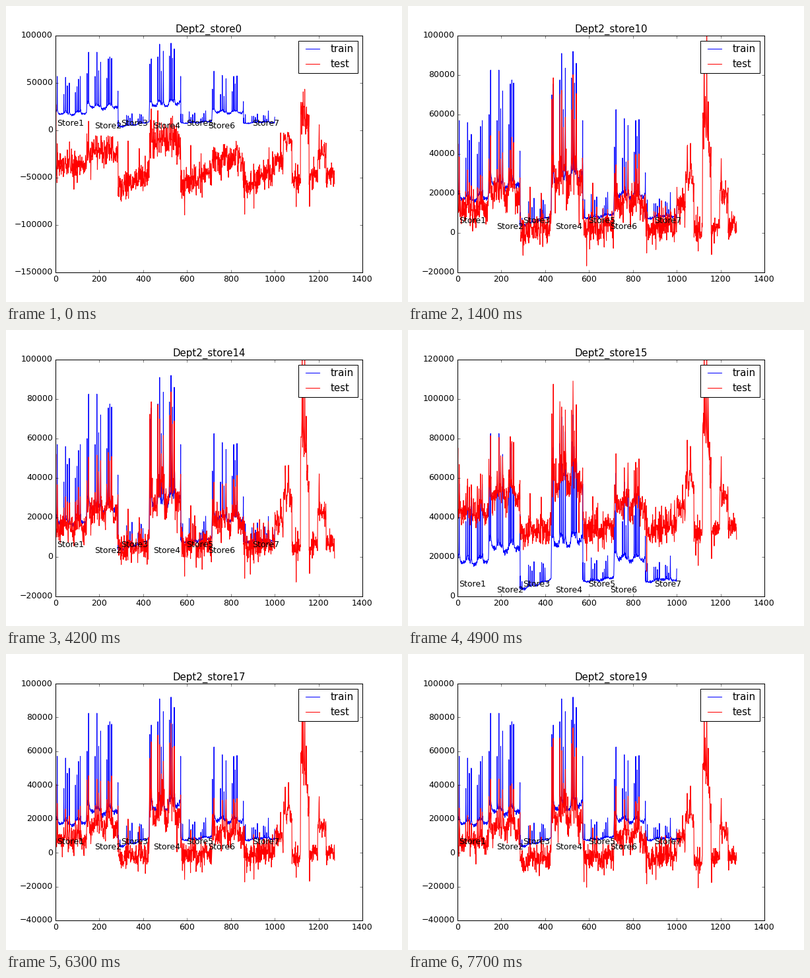
Recreate the animation shown at these times as a matplotlib script. Size 600 by 450 pixels, loop 8000 ms.

```python
import numpy as np
import matplotlib.pyplot as plt
from matplotlib.animation import FuncAnimation

plt.style.use("classic")
plt.rcParams.update({
    "font.sans-serif": ["DejaVu Sans"],
    "savefig.dpi": "figure",
    "savefig.facecolor": "white",
})

TRAIN_LEN, TEST_LEN = 143, 39
SPLIT = 7 * TRAIN_LEN
TOTAL = SPLIT + 7 * TEST_LEN
HOLD = 7  # ticks of 100 ms per chart
x = np.arange(TOTAL)

# Weekly sales in thousands: start, middle and end of each store
BASES = [(18, 16, 18), (26, 22, 24.5), (3.5, 5.2, 8.5), (26, 25.5, 28.5),
         (7.2, 7.8, 9.5), (20, 17.5, 18.5), (6.5, 8.5, 8)]
PEAK_WEEKS = np.array([1, 8, 38, 46, 54, 63, 91, 98, 105, 113, 142])
PEAKS = {
    0: [35, 57, 38, 56, 47, 50, 40, 46, 54, 57, 22],
    1: [60, 82.5, 57, 82.5, 63, 72, 55, 75.5, 77.5, 76, 41.5],
    3: [70, 75.5, 77.5, 91, 62.5, 83.5, 78.5, 92, 76, 86, 57],
    5: [43.5, 62.5, 38, 58, 36, 54.5, 41, 57, 49, 57.5, 30.5],
}
LATE_PEAKS = {1048: 14, 1063: 18, 1120: 16, 1125: 50, 1130: 26, 1137: 45,
              1144: 28, 1203: 12}
OUTLIERS = {2: 30, 331: 19, 382: 18, 589: -15, 617: 19, 863: -16, 905: -15,
            1098: -15, 1159: -14}

PROFILE = np.array([9, 16, 0, 22, 1, 12, 2])
NUMBERS = [0, 1, *range(10, 20)]
SHIFTS = [-54, -6, 1, 1, 2, -5, 4, 32, 1, -3, -2, -5]


def bump(center, size, width):
    return size * np.exp(-((x - center) / width) ** 2)


rng = np.random.default_rng(12)
train = np.zeros(SPLIT)
lift = np.zeros(TOTAL)
for k, base in enumerate(BASES):
    start = k * TRAIN_LEN
    curve = np.interp(np.arange(TRAIN_LEN), [0, 65, TRAIN_LEN - 1], base)
    floor = curve[PEAK_WEEKS]
    peaks = PEAKS.get(k, floor + 11 * rng.uniform(0.3, 1.2, floor.size))
    extra = np.maximum(peaks - floor, 0)
    skirt = sum(bump(start + w, 0.09 * e, 4) for w, e in zip(PEAK_WEEKS, extra))
    rough = rng.normal(0, 0.025 * np.mean(base) + 0.15, TRAIN_LEN)
    block = curve + rough + skirt[start:start + TRAIN_LEN]
    block[PEAK_WEEKS] = np.maximum(peaks, block[PEAK_WEEKS])
    train[start:start + TRAIN_LEN] = block

    gain = 0.7 if k == 3 else 0.48
    for w, e in zip(PEAK_WEEKS, extra):
        size = gain * e * rng.uniform(0.85, 1.1)
        lift += bump(start + w, 0.8 * size, 0.9) + bump(start + w, 0.2 * size, 5)
for pos, size in LATE_PEAKS.items():
    lift += bump(pos, 0.7 * size, 1.2) + bump(pos, 0.3 * size, 5)

early = x < SPLIT
store = np.where(early, x // TRAIN_LEN, (x - SPLIT) // TEST_LEN)
phase = np.where(early, x % TRAIN_LEN / TRAIN_LEN, 0.6)
spread = np.where(store == 3, 4.8, 3.5) * (1 + 0.4 * np.exp(-12 * phase))
shared = 0.75 * rng.standard_t(6, TOTAL)
for pos, size in OUTLIERS.items():
    shared[pos] = size / spread[pos]
level = PROFILE[store] * np.where(early, 1, 1.45)
drift = np.isin(store, [2, 4, 6]) * (2 * phase - 1)


def test_series(n):
    own = 0.5 * np.random.default_rng(100 + n).standard_t(7, TOTAL)
    contrast, noise, gain, slope = (1.8, 2, 0.5, 9) if n == 0 else (1.05, 1, 1.1, 1)
    return (SHIFTS[n] + contrast * level + slope * drift + gain * lift
            + noise * spread * (shared + own)) * 1000


def y_ticks(shift):
    if shift < -50:
        return np.arange(-150, 101, 50) * 1000
    if shift > 20:
        return np.arange(0, 121, 20) * 1000
    return np.arange(-40 if shift < -2 else -20, 101, 20) * 1000


tests = [test_series(n) for n in range(len(NUMBERS))]

fig = plt.figure(figsize=(8, 6), dpi=75, facecolor="white")
ax = fig.add_axes([0.125, 0.1, 0.775, 0.8])
ax.plot(x[:SPLIT], train * 1000, "b", label="train")
test_line, = ax.plot(x, tests[0], "r", label="test")
ax.set_xlim(0, 1400)
ax.legend(loc="upper right")
title = ax.set_title("")
for k, left in enumerate([5, 177, 298, 445, 597, 697, 897]):
    ax.text(left, 2000 if k % 2 else 5000, f"Store{k + 1}")


def draw(i):
    n = i // HOLD
    ticks = y_ticks(SHIFTS[n])
    test_line.set_ydata(tests[n])
    ax.set_yticks(ticks)
    ax.set_ylim(ticks[0], ticks[-1])
    title.set_text(f"Dept2_store{NUMBERS[n]}")
    return test_line, title


anim = FuncAnimation(fig, draw, frames=80, interval=100, repeat=True,
                     repeat_delay=0, blit=False)
plt.show()
```
